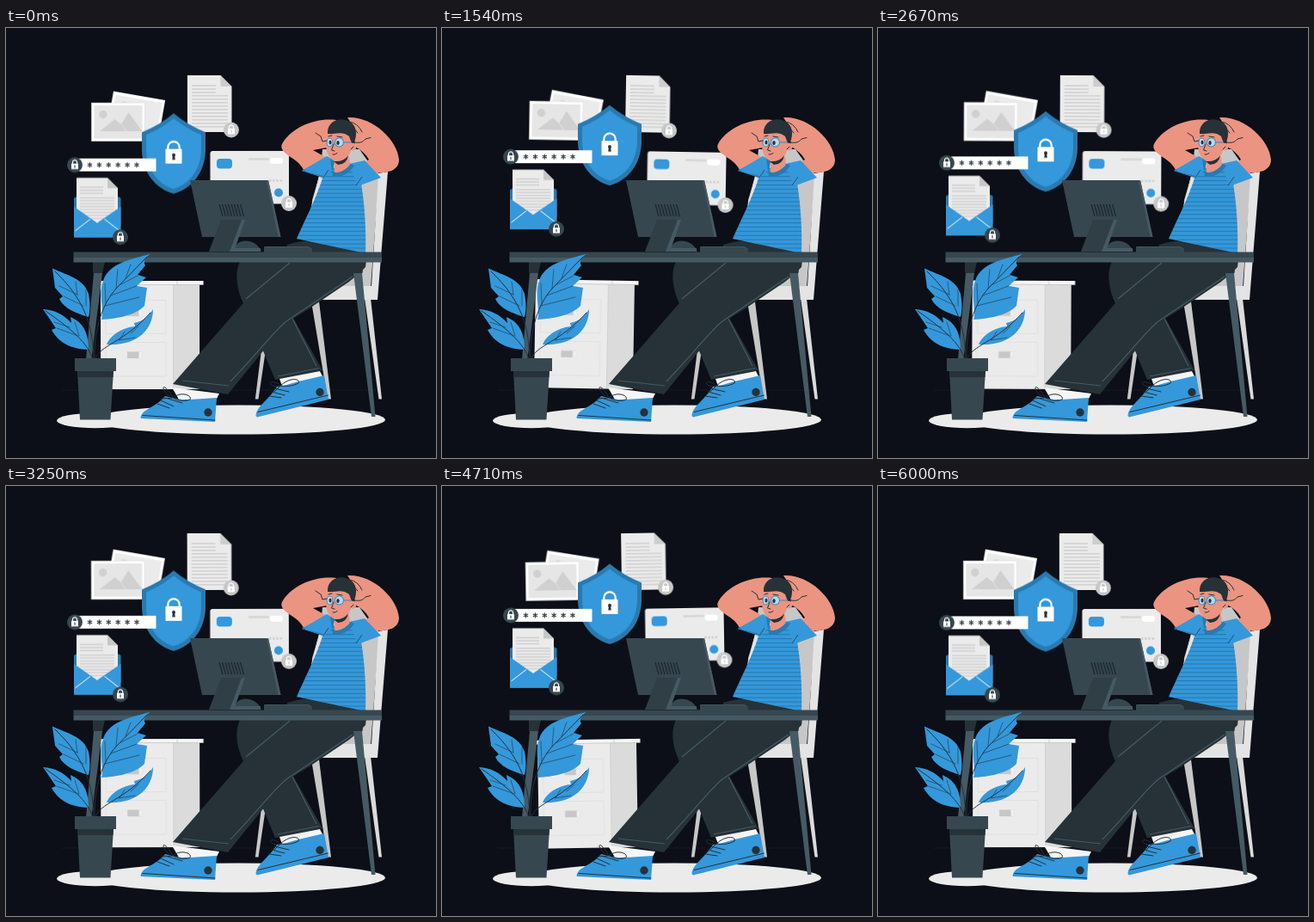
An HTML page that plays this animation: 500 by 500 pixels, repeating every 6040 ms.

```html
<!DOCTYPE html>
<html lang="en">
<head>
<meta charset="utf-8">
<title>Secure desk</title>
<style>
html, body { margin: 0; width: 100%; height: 100%; overflow: hidden; background: #0c0f17; }
svg { display: block; width: 100vw; height: 100vh; }
.sway { transform-origin: 218.5px 237.5px; animation: sway 6.04s linear -5.99s infinite; }
.float { animation: float 3.02s linear -2.97s infinite; }
@keyframes sway {
  0%, 100% { transform: rotate(0deg); }
  25% { transform: rotate(1deg); }
  75% { transform: rotate(-1deg); }
}
@keyframes float {
  0%, 100% { transform: translateY(0); }
  50% { transform: translateY(-10px); }
}
.ink { fill: #263238; }
.slate { fill: #37474f; }
.steel { fill: #455a64; }
.blue { fill: #3498db; }
.navy { fill: #297ab0; }
.skin { fill: #eb9481; }
.paper { fill: #ebebeb; }
.mist { fill: #dbdbdb; }
.grey { fill: #c7c7c7; }
.white { fill: #fff; }
.line { fill: none; stroke: #263238; stroke-width: 1; stroke-linecap: round; stroke-linejoin: round; }
.seam { fill: none; stroke: #455a64; stroke-width: 1.2; }
.rule { fill: none; stroke: #cfcfcf; stroke-width: 1.5; }
</style>
</head>
<body>
<svg viewBox="0 0 500 500">
  <defs>
    <pattern id="rules" width="60" height="4" patternUnits="userSpaceOnUse" y="78">
      <rect width="60" height="1.6" fill="#d2d2d2"/>
    </pattern>
    <pattern id="fineRules" width="60" height="3.4" patternUnits="userSpaceOnUse" y="197">
      <rect width="60" height="1.4" fill="#cfcfcf"/>
    </pattern>
    <pattern id="stripes" width="100" height="4.9" patternUnits="userSpaceOnUse" y="177">
      <rect width="100" height="1.1" fill="#2878ad"/>
    </pattern>
    <g id="lock">
      <path d="M-2.6-.5V-2.6a2.6 2.6 0 0 1 5.2 0V-.5" fill="none" stroke="#fff" stroke-width="1.2"/>
      <rect class="white" x="-4" y="-1" width="8" height="6.4"/>
      <path d="M0 1v2.4" stroke="currentColor" stroke-width="1.2" stroke-linecap="round"/>
    </g>
    <path id="star" d="M0-3V3M-2.6-1.5 2.6 1.5M-2.6 1.5 2.6-1.5" stroke="#263238" stroke-width="1.1"/>
  </defs>

  <path d="M65 421H431" stroke="#263238" stroke-width=".5" opacity=".7"/>
  <ellipse class="paper" cx="270" cy="455.5" rx="171" ry="17"/>
  <ellipse class="paper" cx="104" cy="456.5" rx="45" ry="8.7"/>

  <g class="sway">
    <!-- cabinet -->
    <path class="paper" d="M110 298H195V420H110z"/>
    <path class="mist" d="M194.500 298H225V420H194.500z"/>
    <path d="M194.500 298V420" stroke="#c4c4c4" stroke-width=".6"/>
    <path fill="#f5f5f5" d="M108 294H229.500V298.500H108z"/>
    <path d="M108 298.500H229.500M199 294V298.500" stroke="#bdbdbd" stroke-width=".7"/>
    <path d="M116 316.500H186V355.500H116zM116 365.500H186V405H116z" fill="none" stroke="#dedede" stroke-width=".8"/>
    <path d="M141 327.500H158V335H141zM141 376.500H158V384H141z" fill="#f2f2f2" stroke="#d9d9d9" stroke-width=".5"/>
    <path class="grey" d="M141 327.500H154.500V335H141zM141 376.500H154.500V384H141z"/>

    <!-- document -->
    <path class="paper" d="M211 55H249.500L262.500 68V121H211z"/>
    <path fill="#cdcdcd" d="M249.500 55V68H262.500z"/>
    <path class="rule" d="M216 67H244M216 71H244M216 75H244"/>
    <rect x="216" y="78" width="42" height="38" fill="url(#rules)"/>
    <circle class="grey" cx="262" cy="118.500" r="9"/>
    <use href="#lock" x="262" y="118" color="#c7c7c7"/>

    <!-- pictures -->
    <g transform="rotate(10 125 74)">
      <rect class="white" x="125" y="73.500" width="61" height="43"/>
      <rect class="paper" x="128" y="77" width="55" height="36"/>
      <circle class="mist" cx="140" cy="87" r="4.600"/>
    </g>
    <rect class="white" x="99.500" y="87" width="62" height="44.500" stroke="#d8d8d8" stroke-width=".5"/>
    <rect x="102.500" y="90" width="56" height="38.500" fill="#e6e6e6"/>
    <circle cx="113" cy="100.500" r="4.700" fill="#d0d0d0"/>
    <path fill="#d0d0d0" d="M109 120 126.500 106 134 112 142.500 98 158.500 120z"/>
    <path d="M134 112 140 120" stroke="#e6e6e6" stroke-width=".8"/>

    <!-- card -->
    <rect class="paper" x="237.500" y="143" width="91.500" height="61.500" rx="3"/>
    <rect class="blue" x="245" y="152" width="18" height="11.500" rx="4"/>
    <path d="M282 152.500H306" stroke="#d6d6d6" stroke-width="2.500"/>
    <rect class="white" x="307" y="151" width="15" height="7" rx="3"/>
    <path d="M306 177.500H322" stroke="#cfcfcf" stroke-width="2.500" stroke-dasharray="2.500 1.700"/>
    <circle class="blue" cx="317" cy="191.500" r="5"/>
    <circle class="grey" cx="329" cy="204" r="9"/>
    <use href="#lock" x="329" y="203.500" color="#c7c7c7"/>
  </g>

  <g class="float">
    <!-- shield -->
    <path class="navy" d="M195 99.500Q211 113 232 121.500V143C231 169 216 187 195 193 174 187 159 169 158 143V121.500Q179 113 195 99.500z"/>
    <path class="blue" d="M195 105.500Q209 117 227 124.500V143C226 166 213 182 195 187.500 177 182 164 166 163 143V124.500Q181 117 195 105.500z"/>
    <path d="M188.300 142V139a6.700 6.700 0 0 1 13.400 0v3" fill="none" stroke="#fff" stroke-width="2.300"/>
    <rect class="white" x="185.500" y="141" width="19" height="17"/>
    <circle class="ink" cx="195" cy="148" r="2"/>
    <path class="ink" d="M194 148h2l.8 5.500h-3.600z"/>

    <!-- password -->
    <rect class="white" x="80" y="152" width="94.500" height="15"/>
    <use href="#star" x="97.500" y="159.500"/>
    <use href="#star" x="108.400" y="159.500"/>
    <use href="#star" x="119.300" y="159.500"/>
    <use href="#star" x="130.200" y="159.500"/>
    <use href="#star" x="141.100" y="159.500"/>
    <use href="#star" x="152" y="159.500"/>
    <circle class="slate" cx="80" cy="159.500" r="9"/>
    <use href="#lock" x="80" y="159" color="#37474f"/>

    <!-- envelope -->
    <path class="navy" d="M79 198 85 195H128L133.500 198V230H79z"/>
    <path class="paper" d="M82 174.500H118L130 186.500V222L106 236 82 222z"/>
    <path class="grey" d="M118 174.500V186.500H130z"/>
    <path class="rule" d="M86 185.500H113M86 189H113M86 192.500H113"/>
    <rect x="86" y="197" width="40" height="26" fill="url(#fineRules)"/>
    <path class="blue" d="M79 208 106 227 133.500 208V244H79z"/>
    <path d="M80.500 236 98 222.500M114.500 222.500 132 236" stroke="#fff" stroke-width="1"/>
    <circle class="slate" cx="133" cy="243.500" r="9"/>
    <use href="#lock" x="133" y="243" color="#37474f"/>
  </g>

  <!-- chair -->
  <path class="grey" d="M297 374H302L293.500 431.500H289.800zM355 318H364L378 431.500H374z"/>
  <path class="mist" d="M417 314H424L437 431.500H433.500z"/>
  <path class="grey" d="M368 141H411L423 158 434 170 424 302H350L356 200 365 170z"/>
  <path fill="#e4e4e4" d="M364 172 354 212 380 190zM433 169 444 167 432 316H346V300H425z"/>

  <!-- far leg and shoe -->
  <path class="ink" d="M273 270C266 282 267 300 275 318L313 409 368 398 330 330 340 270z"/>
  <path class="seam" d="M333 338 361 393M316 405 364 395.500"/>
  <path fill="#f5f5f5" d="M318 408 365 399 369 407 322 419z"/>
  <path class="blue" d="M290.500 451C291 440 305 433 315 417Q328 415 340 411L370 404 375 432 292 452.500z"/>
  <path class="line" d="M293 446.500 374.500 427M309 423 324 427M306 428 320 430M312 419 329 423M317 414C302 406 306 420 319 416 331 405 343 408 340 413 332 417 325 417 319 416L312 423"/>
  <circle class="ink" cx="365" cy="423.500" r="4.700"/>

  <!-- near leg and shoe -->
  <path fill="#f5f5f5" d="M193 418 248 425 244 433 201 432z"/>
  <path class="blue" d="M156.500 453C158 443 173 442 185 428Q203 433 214 432L245 430 243 458 157 454z"/>
  <path class="line" d="M159 450.500 243 456M180 433 195 440M176 437 190 442M185 430 205 436M190 428C178 418 183 412 191 425L194 430C203 422 217 427 214 432 207 435 200 433 194 430L181 431"/>
  <circle class="ink" cx="235" cy="447" r="4.700"/>
  <path class="ink" d="M327 252Q350 245 366 249L420 262 418 278C408 288 404 291 399 295L353 326C333 338 324 344 318 352L258 426 194 414 282 313 326 270z"/>
  <path class="seam" d="M330 273 279 315M403 289C376 307 338 333 326 341 313 351 289 382 261 411M205 410 259 416"/>

  <!-- shirt and neck -->
  <path id="torso" class="blue" d="M369 172 379 163 407 160 413 181C417 205 419 235 418 262L338 245C347 224 361 198 369 172z"/>
  <path fill="url(#stripes)" d="M369 172 379 163 407 160 413 181C417 205 419 235 418 262L338 245C347 224 361 198 369 172z"/>
  <path class="skin" d="M322 133C334 115 360 104 384 107L379 138 357 142 373 151 346 165C340 151 318 147 320.500 136z"/>
  <path class="skin" d="M397 104C426 102 455 130 457 153 457 167 441 169 430 168L417 156 422 153Q417 144 406 138L404 115z"/>
  <path class="skin" d="M382 150H399L400 160Q391 169 382 170z"/>
  <path class="blue" d="M344 166 373 149 382 154 380 165 370 174zM399 158 417 154 436 174 409 184z"/>
  <path class="navy" d="M377 152 382 154 380 167Q390 171 401 158L405 160Q396 174 380 173zM346 164 349 167 369 172 368 174 344 166z"/>
  <path d="M407 183 414 173M369 174 375 165" stroke="#263238" stroke-width=".7"/>

  <!-- head -->
  <path class="skin" d="M374 120C371 132 371 145 377 151 385 160 397 155 401 143L404 120z"/>
  <circle class="skin" cx="403" cy="138" r="4.500"/>
  <path class="ink" d="M381 155Q393 156 398 148 396 159 386 159z"/>
  <path class="ink" d="M374 123C373 111 384 104 395 107 406 110 409 119 406 130L402 134 399 126C391 119 382 124 374 123z"/>
  <g fill="#b9d9ee" stroke="#3a8fc7" stroke-width="1.100">
    <ellipse cx="376.500" cy="133" rx="3.500" ry="5"/>
    <circle cx="387.500" cy="133" r="5"/>
    <path d="M392.500 133H401" fill="none"/>
  </g>
  <ellipse class="ink" cx="377" cy="133" rx="1.500" ry="2.500"/>
  <ellipse class="ink" cx="386" cy="133.500" rx="1.700" ry="2.500"/>
  <path class="line" d="M375 126 379 125M385 126 391 127M381 135 378.500 142 382 143M380 147Q382 148 385 145.500M404 138 401 141"/>
  <path class="line" d="M360 122 366 126 368 132 373 131M406 133C411 134 415 133 418 129L424 127.500M399 109Q409 110 414 121M401 115Q406 117 409 122"/>

  <!-- desk -->
  <path class="steel" d="M102 285H112L91 452H87zM404 285H414L429.500 452H425z"/>
  <path class="ink" d="M101 272H115L112 285H101zM402 272H416L414.500 285H404z"/>
  <path class="slate" d="M300 254H352L356 257V261H300z"/>
  <path d="M302 254.500H351L355 257" fill="none" stroke="#455a64" stroke-width=".8"/>
  <path class="slate" d="M265 260C265 244 290 243 297 260z"/>
  <path class="steel" d="M264 256H296V260H264z"/>
  <path class="slate" d="M214 177H305L319.500 243H228z"/>
  <path class="steel" d="M303 177H305L319.500 243H316.500z"/>
  <path fill="#303f46" d="M250 223H275L262 260H236z"/>
  <path class="steel" d="M274 223H278L265 260H260z"/>
  <path d="M248 205 252 219M251.500 205 255.500 219M255 205 259 219M258.500 205 262.500 219M262 205 266 219M265.500 205 269.500 219M269 205 273 219M272.500 205 276.500 219" stroke="#1e292e" stroke-width="1.300"/>
  <path class="slate" d="M78.500 260.500H437V267.500H78.500z"/>
  <path class="steel" d="M78.500 267H437V272.500H78.500z"/>

  <!-- plant -->
  <g class="blue">
    <path d="M168 262.500C162 267 159 272 162 276L153 287 163 290 152 300 164 302 161 323C151 334 129 338 111 339 115 331 107 309 113 294 120 272 148 269 168 262.500z"/>
    <path d="M54 279.500C72 288 90 291 96 309 98 320 98 328 96 336 82 332 67 326 62 315L66 312 57 302z"/>
    <path d="M43 327C57 328 67 333 76 343L75 336C91 343 96 356 96 374 70 373 59 362 53 351L58 349z"/>
    <path d="M171 327C171 351 152 370 117 368 123 354 139 348 150 347L149 343C160 341 166 335 171 327z"/>
  </g>
  <path class="line" stroke-width="1.200" d="M103 385C102 350 112 321 128 303L164 266M102 385C101 350 94 318 57 283M101 385C95 366 76 350 46 329M104 385C108 369 137 366 168 331"/>
  <path class="line" style="stroke-width:.6" d="M116 320 115 297M128 303 130 281M139 291 145 275M115 323 155 313M122 311 152 300M132 299 153 288M90 323 67 312M83 310 62 300M93 323 93 304M83 310 81 295M84 358 59 349M74 348 56 342M85 358 80 342M132 363 138 353M145 355 154 347M131 363 150 360"/>
  <path class="slate" d="M83 398H125L121.500 455.500H86z"/>
  <path class="ink" d="M83 398H125L124.500 406H83.500z"/>
  <path class="slate" d="M80 384H128V399H80z"/>
</svg>
</body>
</html>
```
